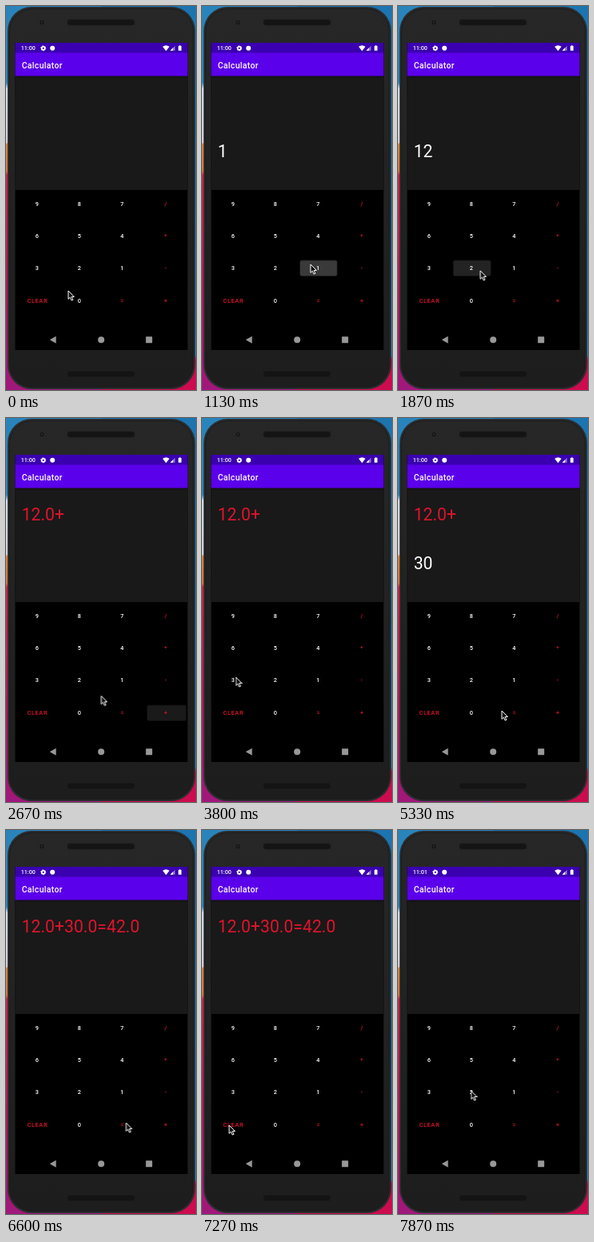
Animation, 238 px wide and 480 px high, one loop 8 s. Source, as an HTML page:

```html
<!DOCTYPE html>
<html lang="en">
<head>
<meta charset="utf-8">
<title>Calculator</title>
<style>
html, body { margin: 0; width: 100%; height: 100%; overflow: hidden; background: #111; }
svg { display: block; width: 100vw; height: 100vh; }
text { font-family: Roboto, sans-serif; fill: #fff; white-space: pre; }
.title { font-size: 10.5px; font-weight: 500; letter-spacing: .3px; }
.clock { font-size: 7.2px; font-weight: 500; }
.big { font-size: 21.2px; }
.key { font-size: 7.35px; font-weight: 500; letter-spacing: .66px; text-anchor: middle; }
.red { fill: #e0142c; }

.show { visibility: hidden; animation: 8s step-end infinite; }
.one { animation-name: one; }
.two { animation-name: two; }
.sum { animation-name: sum; }
.three { animation-name: three; }
.zero { animation-name: zero; }
.result { animation-name: result; }
.before { animation-name: before; }
.after { animation-name: after; }
@keyframes one { 0%, 29.4% { visibility: hidden } 13.1% { visibility: visible } }
@keyframes two { 0%, 29.4% { visibility: hidden } 19.4% { visibility: visible } }
@keyframes sum { 0%, 93.1% { visibility: hidden } 29.4% { visibility: visible } }
@keyframes three { 0%, 70.6% { visibility: hidden } 50.6% { visibility: visible } }
@keyframes zero { 0%, 70.6% { visibility: hidden } 61% { visibility: visible } }
@keyframes result { 0%, 93.1% { visibility: hidden } 70.6% { visibility: visible } }
@keyframes before { 0% { visibility: visible } 95%, 100% { visibility: hidden } }
@keyframes after { 0% { visibility: hidden } 95%, 100% { visibility: visible } }

/* --t is the moment of the press */
.press { fill: #fff; opacity: 0; animation: press 8s linear calc(var(--t) - 8s) infinite; }
@keyframes press {
  0%, 6.25%, 100% { opacity: 0 }
  1.2%, 4.6% { opacity: .23 }
}

#cursor { animation: move 8s ease-in-out infinite; }
@keyframes move {
  0%, .8% { transform: translate(78px, 356px) }
  8.8%, 14.9% { transform: translate(136px, 323px) }
  18%, 21.9% { transform: translate(87px, 324px) }
  27.5%, 30% { transform: translate(197px, 371px) }
  36.75%, 55.8% { transform: translate(42.5px, 324px) }
  59.6%, 63.5% { transform: translate(91px, 366px) }
  68.8%, 82.4% { transform: translate(150.5px, 366px) }
  89.1%, 93.75% { transform: translate(34px, 369px) }
  97.9%, 100% { transform: translate(91.5px, 326px) }
}
</style>
</head>
<body>
<svg viewBox="0 0 238 480" preserveAspectRatio="none">
  <defs>
    <linearGradient id="left" x2="0" y2="1">
      <stop offset="0" stop-color="#2a84bc"/>
      <stop offset=".2" stop-color="#2a84bc"/>
      <stop offset=".215" stop-color="#d4dce6"/>
      <stop offset=".355" stop-color="#d4d0d8"/>
      <stop offset=".36" stop-color="#d8843c"/>
      <stop offset=".43" stop-color="#d8743c"/>
      <stop offset=".44" stop-color="#cc2448"/>
      <stop offset=".75" stop-color="#b81658"/>
      <stop offset="1" stop-color="#a0187c"/>
    </linearGradient>
    <linearGradient id="right" x2="0" y2="1">
      <stop offset="0" stop-color="#1c74b0"/>
      <stop offset=".91" stop-color="#2a84b4"/>
      <stop offset=".92" stop-color="#cc0c4e"/>
      <stop offset="1" stop-color="#cc0c4e"/>
    </linearGradient>
    <linearGradient id="body" x2="0" y2="1">
      <stop offset="0" stop-color="#272727"/>
      <stop offset="1" stop-color="#1d1d1d"/>
    </linearGradient>
    <linearGradient id="shade" x2="0" y2="1">
      <stop offset="0" stop-opacity=".4"/>
      <stop offset="1" stop-opacity="0"/>
    </linearGradient>
  </defs>

  <rect width="119" height="480" fill="url(#left)"/>
  <rect x="119" width="119" height="480" fill="url(#right)"/>

  <rect x="2" y="1" width="235" height="478" rx="30" fill="#2b2d2f"/>
  <rect x="4.5" y="3.5" width="230" height="473" rx="28" fill="url(#body)" stroke="#1a1a1a"/>
  <circle cx="45" cy="20.5" r="2.6" fill="#151515"/>
  <circle cx="45" cy="20.5" r="1" fill="#30363c"/>
  <g fill="#141414" stroke="#1a1a1a">
    <rect x="77" y="17" width="84" height="7" rx="3"/>
    <rect x="77" y="456.5" width="84" height="7" rx="3"/>
  </g>

  <rect x="11.5" y="46" width="216" height="384" fill="#000"/>
  <rect x="11.5" y="87" width="216" height="143" fill="#191919"/>
  <rect x="11.5" y="87" width="216" height="4" fill="url(#shade)"/>
  <rect x="11.5" y="58" width="216" height="29.5" fill="#5b00ea"/>
  <rect x="11.5" y="46" width="216" height="12.5" fill="#3a00b0"/>

  <g transform="translate(-.3 -.5)">
    <text class="clock show before" x="19" y="55.7">11:00</text>
    <text class="clock show after" x="19" y="55.7">11:01</text>
    <circle cx="47" cy="53.3" r="2" fill="none" stroke="#fff" stroke-width="1.7"/>
    <circle cx="47" cy="53.3" r="3" fill="none" stroke="#fff" stroke-width="1" stroke-dasharray="1.57"/>
    <circle cx="58.5" cy="53.3" r="3" fill="#fff"/>
    <g fill="#fff">
      <path d="M196.5 51.3Q200.8 48.2 205 51.3L200.8 56.7Z"/>
      <path d="M206 56.2L212 50.2V56.2Z" opacity=".45"/>
      <path d="M206 56.2L209.5 52.7V56.2Z"/>
      <path d="M216.2 50.6h1v-.8h1.8v.8h1v5.6h-3.8z"/>
    </g>
    <text class="title" x="20" y="78">Calculator</text>

    <text class="big" x="20" y="128"><tspan class="red show sum">12.0+</tspan><tspan class="red show result">30.0=42.0</tspan></text>
    <text class="big" x="20" y="189"><tspan class="show one">1</tspan><tspan class="show two">2</tspan></text>
    <text class="big" x="20" y="189"><tspan class="show three">3</tspan><tspan class="show zero">0</tspan></text>

    <g id="keys"></g>

    <g fill="#989898">
      <path d="M55 417.7L63 413.2V422.2Z"/>
      <circle cx="119.5" cy="417.7" r="4"/>
      <rect x="175.5" y="413.7" width="8" height="8" rx=".5"/>
    </g>
  </g>

  <path id="cursor" d="M0 0V10.4L2.4 8.2L4.1 12.1L5.9 11.3L4.2 7.5H7.4Z" fill="#111" stroke="#fff" stroke-linejoin="round"/>
</svg>
<script>
const keys = document.getElementById('keys');
const cols = [[16, 47], [69.5, 47], [123, 46.5], [177, 49]];
const centers = [39.5, 92.5, 146, 200.5];
const rows = [248, 288, 328, 369];
const labels = [['9', '8', '7', '/'], ['6', '5', '4', '*'], ['3', '2', '1', '-'], ['CLEAR', '0', '=', '+']];
const presses = { 1: .95, 2: 1.45, '+': 2.23, 3: 3.9, 0: 4.76, '=': 5.5, CLEAR: 7.3 };

function add(tag, attrs, text = '') {
  const el = document.createElementNS('http://www.w3.org/2000/svg', tag);
  for (const name in attrs) el.setAttribute(name, attrs[name]);
  el.textContent = text;
  keys.append(el);
}

labels.forEach((row, r) => row.forEach((label, c) => {
  if (label in presses) {
    const [x, width] = cols[c];
    add('rect', { class: 'press', x, y: rows[r] - 9.5, width, height: 19.5, rx: 2, style: `--t: ${presses[label]}s` });
  }
  const color = /\d/.test(label) ? '' : ' red';
  add('text', { class: 'key' + color, x: centers[c] + .1, y: rows[r] + 2.6 }, label);
}));
</script>
</body>
</html>
```
